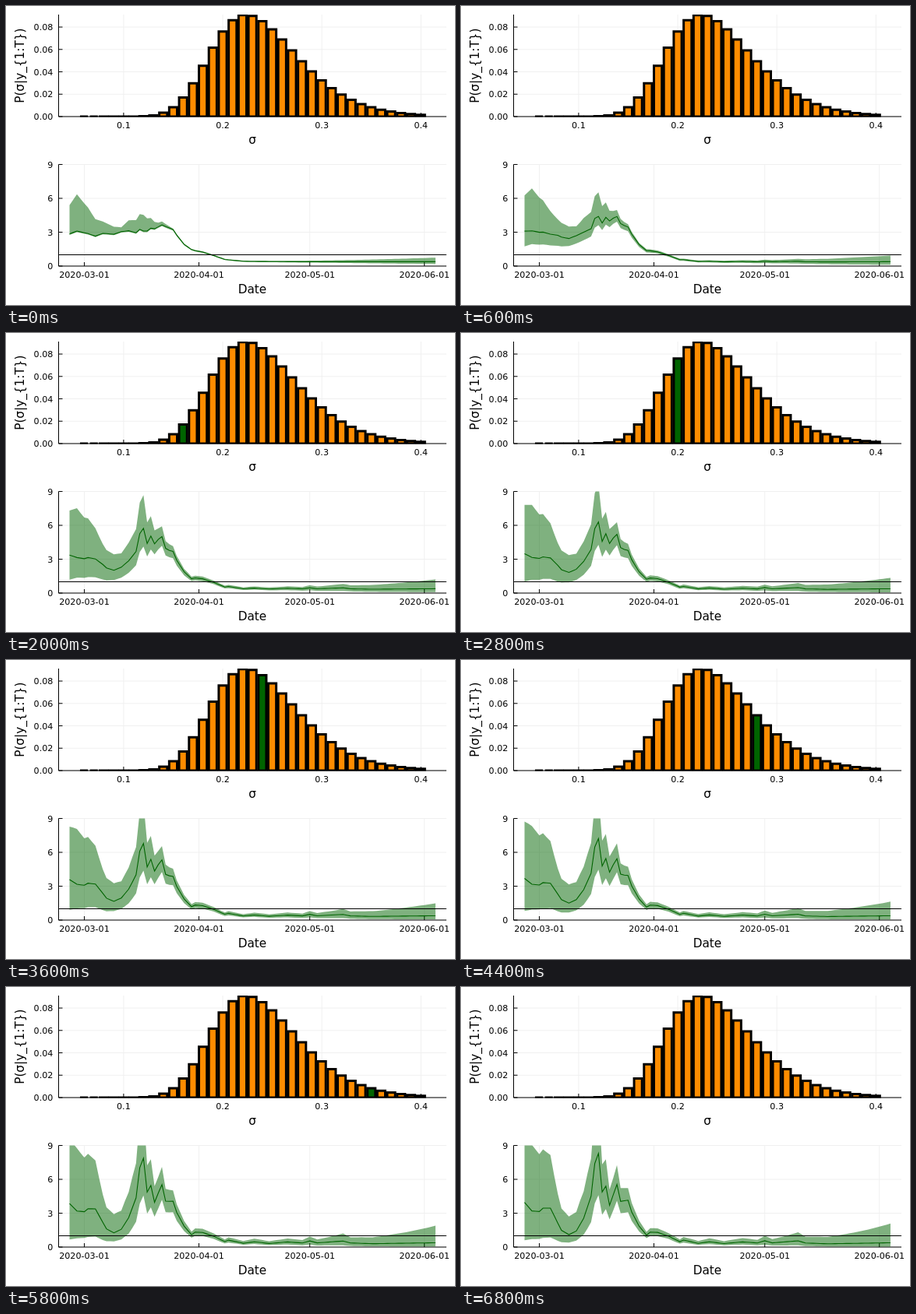
Recreate the animation shown at these times as an HTML page with a canvas. Size 576 by 384 pixels, loop 7 s.

```html
<!DOCTYPE html>
<html>
<head>
<meta charset="utf-8">
<style>
html, body { margin: 0; height: 100%; overflow: hidden; background: #fff; }
canvas { display: block; }
</style>
</head>
<body>
<canvas id="stage" width="576" height="384"></canvas>
<script>
const ctx = document.getElementById('stage').getContext('2d');
const LEFT = 67.5, RIGHT = 565, STEP_MS = 200, STEPS = 35, DAYS = 100;
const TICK_SIZE = 11.11, LABEL_SIZE = 15.28;
const GREEN = '#006400', ORANGE = '#ff8c00', GRID = '#f0f0f0';

const sigmaX = s => 23.75 + s * 1271.3;
const probY = p => 142 - p * 1437;
const dayX = d => 81.5 + d * 4.742;
const rateY = r => 334 - r * 14.5;

// Log-normal histogram with a wider right flank
function probability(sigma) {
  const z = Math.log(sigma / .223);
  return .0909 * Math.exp(-z * z / (z < 0 ? .066 : .085));
}

// Key points [day, value at the first step, value at the last step]
const median = [
  [0, 2.85, 3.95], [2, 3.1, 3.2], [4, 2.95, 3.15], [5, 2.88, 3.45], [7, 2.65, 3.45], [9, 2.9, 2.12],
  [10, 2.88, 1.48], [12, 2.82, 1.1], [14, 3.05, 1.42], [16, 3.13, 2.55], [18, 2.95, 4.5], [19, 3.25, 7.4],
  [20, 3.1, 8.3], [21, 3.1, 4.87], [22, 3.35, 5.4], [23, 3.3, 3.7], [25, 3.65, 5.55], [26, 3.5, 4.05],
  [28, 3.25, 4.15], [29, 2.75, 3.1], [31, 1.92, 1.85], [33, 1.46, 1.06], [34, 1.36, 1.32], [36, 1.24, 1.3],
  [39, .93, .96], [42, .59, .48], [43, .55, .62], [47, .43, .33], [50, .41, .47], [54, .4, .31],
  [59, .39, .46], [63, .39, .36], [65, .39, .56], [67, .39, .37], [74, .39, .55], [76, .39, .36],
  [82, .39, .29], [99, .39, .38]
];
// Band widths as log ratios to the median
const upperWidth = [
  [0, .64, .93], [2, .72, 1.04], [5, .59, .92], [9, .31, .8], [12, .21, .9], [14, .12, .78], [16, .26, .66],
  [20, .38, .45], [24, .1, .28], [28, .02, .23], [39, .07, .25], [47, .1, .49], [65, .2, .58],
  [76, .31, .93], [99, .65, 1.7]
];
const lowerWidth = [
  [0, .03, 1.88], [2, .03, 1.52], [9, .03, 1.35], [12, .03, 1], [16, .03, .84], [20, .03, .59],
  [25, .03, .3], [39, .06, .29], [42, .1, .43], [59, .17, .73], [74, .33, 1.3], [99, .77, 2.25]
];

const mix = (a, b, t) => a + (b - a) * t;

function valueAt(keys, day, progress) {
  const next = Math.max(1, keys.findIndex(k => k[0] >= day));
  const [d0, a0, b0] = keys[next - 1], [d1, a1, b1] = keys[next];
  return mix(mix(a0, b0, progress), mix(a1, b1, progress), (day - d0) / (d1 - d0));
}

function rates(step) {
  const t = step / (STEPS - 1), p = t ** .62;
  const middle = [], upper = [], lower = [];
  for (let d = 0; d < DAYS; d++) {
    // The second hump is fullest halfway
    const hump = 3.5 * p * (1 - p) * Math.exp(-(((d - 23) / 2.5) ** 2));
    const m = valueAt(median, d, p) + hump;
    const point = r => [dayX(d), rateY(r)];
    middle.push(point(m));
    upper.push(point(m * Math.exp(valueAt(upperWidth, d, p))));
    lower.push(point(m * Math.exp(-valueAt(lowerWidth, d, Math.sqrt(t)))));
  }
  return { middle, band: [...upper, ...lower.reverse()] };
}

function polyline(points) {
  ctx.beginPath();
  points.forEach(p => ctx.lineTo(...p));
}

function stroke(points, color, width = 1) {
  polyline(points);
  ctx.strokeStyle = color;
  ctx.lineWidth = width;
  ctx.stroke();
}

function text(label, x, y, size, align = 'center') {
  ctx.font = `${size}px "DejaVu Sans", sans-serif`;
  ctx.textAlign = align;
  ctx.fillStyle = '#000';
  ctx.fillText(label, x, y);
}

function panel(top, bottom, xTicks, yTicks, paint) {
  for (const [x] of xTicks) stroke([[x, top], [x, bottom]], GRID);
  for (const [y] of yTicks) stroke([[LEFT, y], [RIGHT, y]], GRID);
  stroke([[LEFT, top], [LEFT, bottom], [RIGHT, bottom]], '#000');
  for (const [x, label] of xTicks) {
    stroke([[x, bottom], [x, bottom - 5]], '#000');
    text(label, x, bottom + 15, TICK_SIZE);
  }
  for (const [y, label] of yTicks) {
    stroke([[LEFT, y], [LEFT + 5, y]], '#000');
    text(label, 60.3, y + 4, TICK_SIZE, 'right');
  }
  ctx.save();
  ctx.beginPath();
  ctx.rect(LEFT, top, RIGHT - LEFT, bottom - top + .5);
  ctx.clip();
  paint();
  ctx.restore();
}

function bar(sigma, color) {
  const width = 10.17, top = probY(probability(sigma));
  ctx.beginPath();
  ctx.rect(sigmaX(sigma) - width / 2, top, width, 142 - top);
  ctx.fillStyle = color;
  ctx.fill();
  ctx.strokeStyle = '#000';
  ctx.lineWidth = 3;
  ctx.stroke();
}

const sigmaTicks = [.1, .2, .3, .4].map(s => [sigmaX(s), s.toFixed(1)]);
const probTicks = [0, .02, .04, .06, .08].map(p => [probY(p), p.toFixed(2)]);
const dateTicks = [[4, 3], [35, 4], [65, 5], [96, 6]].map(([d, month]) => [dayX(d), `2020-0${month}-01`]);
const rateTicks = [0, 3, 6, 9].map(r => [rateY(r), r]);

function draw(step) {
  ctx.fillStyle = '#fff';
  ctx.fillRect(0, 0, 576, 384);

  panel(11, 142, sigmaTicks, probTicks, () => {
    for (let k = 0; k < STEPS; k++) bar(.06 + k / 100, k === step ? GREEN : ORANGE);
  });
  text('σ', 316, 177, LABEL_SIZE);
  ctx.save();
  ctx.translate(22.5, 76.7);
  ctx.rotate(-Math.PI / 2);
  text('P(σ|y_{1:T})', 0, 0, LABEL_SIZE);
  ctx.restore();

  panel(203.5, 334, dateTicks, rateTicks, () => {
    const { middle, band } = rates(step);
    polyline(band);
    ctx.fillStyle = 'rgba(0, 100, 0, 0.5)';
    ctx.fill();
    stroke(middle, GREEN, 1.1);
    stroke([[LEFT, 319.5], [RIGHT, 319.5]], '#000');
  });
  text('Date', 316, 369.3, LABEL_SIZE);
}

function tick() {
  draw(Math.floor(performance.now() / STEP_MS) % STEPS);
  requestAnimationFrame(tick);
}
tick();
</script>
</body>
</html>
```
